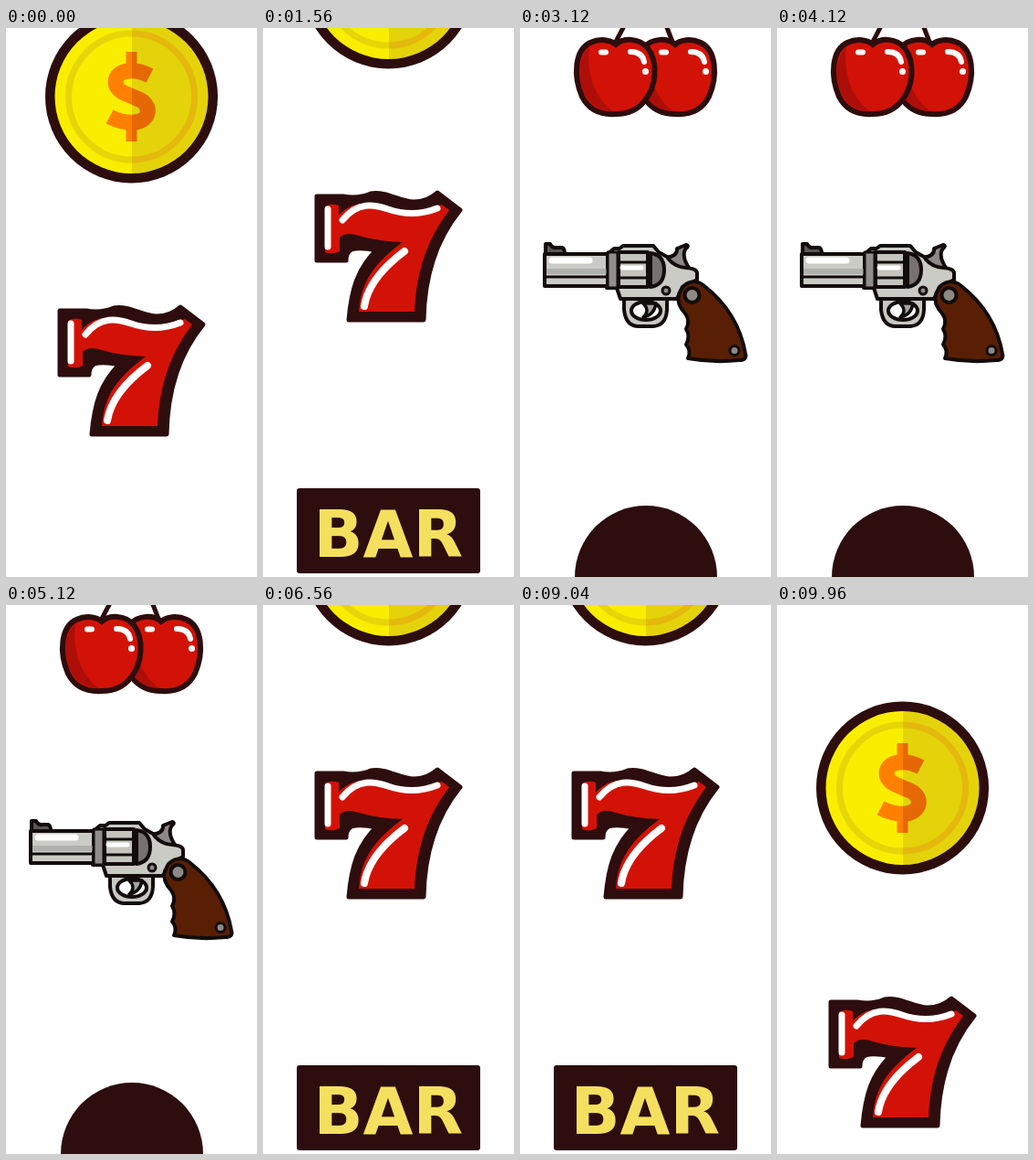
Animation of 275 by 600 pixels, one loop 10000 ms. Source, as an HTML page:

```html
<!DOCTYPE html>
<html lang="en">
<head>
<meta charset="utf-8">
<title>Slot reel</title>
<style>
html, body { margin: 0; width: 100%; height: 100%; overflow: hidden; background: #fff; }
svg { display: block; width: 100%; height: 100%; }
</style>
</head>
<body>
<svg viewBox="0 0 275 600">
  <defs>
    <linearGradient id="face" gradientUnits="userSpaceOnUse" x1="-100" x2="100" y1="0" y2="0">
      <stop offset=".5" stop-color="#f9ee00"/><stop offset=".5" stop-color="#e4d30b"/>
    </linearGradient>
    <linearGradient id="rim" gradientUnits="userSpaceOnUse" x1="-100" x2="100" y1="0" y2="0">
      <stop offset=".5" stop-color="#e5d509"/><stop offset=".5" stop-color="#e4b80c"/>
    </linearGradient>
    <linearGradient id="cash" gradientUnits="userSpaceOnUse" x1="-100" x2="100" y1="0" y2="0">
      <stop offset=".5" stop-color="#ff8000"/><stop offset=".5" stop-color="#e56804"/>
    </linearGradient>

    <g id="coin" transform="translate(137.5 0)">
      <circle r="94.5" fill="#2d0d0d"/>
      <circle r="84" fill="url(#face)"/>
      <circle r="69" fill="none" stroke="url(#rim)" stroke-width="7"/>
      <path d="M-6-49H6V-26H-6ZM-6 26H6V49H-6Z" fill="url(#cash)"/>
      <path d="M20-23C10-28 2-29-4-28C-21-26-22-9-6-3L6 2C23 8 21 26 4 28C-6 29-14 27-24 22" fill="none" stroke="url(#cash)" stroke-width="17"/>
    </g>

    <g id="seven" transform="translate(0 -375)">
      <path d="M59 309L88 309Q104 312 118 306C135 303 150 315 165 315Q180 315 191 305L216 324C193 352 177 390 176 444H94C97 410 104 388 124 368Q106 364 97 367Q91 370 91 379H59Z" fill="#2d0d0d" stroke="#2d0d0d" stroke-width="5" stroke-linejoin="round"/>
      <path d="M68 320Q75 316 83 319V330C98 312 120 316 135 321C157 329 178 326 196 318L204 324C180 356 168 390 166 435H105C107 402 122 382 153 359Q125 358 105 352Q91 347 84 354V369Q76 373 68 370Z" fill="#d31207"/>
      <path d="M71 323V364" stroke="#fff" stroke-width="7" stroke-linecap="round"/>
      <path d="M87 335C104 314 122 318 137 323C157 330 176 328 191 322" fill="none" stroke="#fff" stroke-width="7" stroke-linecap="round"/>
      <path d="M111 429Q116 398 155 369" fill="none" stroke="#fff" stroke-width="8" stroke-linecap="round"/>
    </g>

    <g id="bar">
      <rect x="37" y="-47" width="201" height="93" rx="3" fill="#2d0d0d"/>
      <text x="55.5" y="27.5" font-family="'DejaVu Sans', sans-serif" font-weight="700" font-size="71" fill="#f4e05e">BAR</text>
    </g>

    <path id="fruit" d="M105 18C113 11 130 10 140 22C152 38 149 64 137 79C128 91 117 94 105 94C90 95 76 91 68 75C58 52 60 24 77 16C88 11 99 13 105 18Z"/>
    <path id="shade" d="M76 20C58 38 61 90 102 91C83 78 72 50 76 20Z"/>
    <g id="shine" fill="none" stroke="#fff" stroke-width="6" stroke-linecap="round">
      <path d="M89 26.5H94M121 26Q134 26 136 37"/>
      <circle cx="137.5" cy="47.5" r="3.5" fill="#fff" stroke="none"/>
    </g>
    <g id="cherry">
      <path d="M104 17Q111 3 124-20L143-88Q151-40 160-3L167 15" fill="none" stroke="#2d0d0d" stroke-width="5" stroke-linejoin="round"/>
      <g fill="#d31207" stroke="#2d0d0d" stroke-width="6">
        <use href="#fruit" transform="matrix(-1 0 0 1 275 0)"/>
        <use href="#shade" x="66" fill="#ad0e08" stroke="none"/>
        <use href="#fruit"/>
        <use href="#shade" fill="#ad0e08" stroke="none"/>
      </g>
      <use href="#shine"/>
      <use href="#shine" x="66"/>
    </g>

    <g id="gun" transform="translate(0 -300)" stroke="#120c0c" stroke-width="4" stroke-linejoin="round" stroke-linecap="round">
      <path d="M28 248V236H33Q35 241 40 240H46Q49 241 49 247Z" fill="#5c5655"/>
      <path d="M114 294V308Q116 326 130 326H146Q160 325 161 308V294Z" fill="#c9c9c4"/>
      <ellipse cx="138" cy="309" rx="16" ry="10" fill="#fff"/>
      <path d="M135 301Q143 309 135 316Q147 314 149 301Z" fill="#a5a5a1" stroke-width="3.5"/>
      <path d="M158 251Q173 250 172 241L182 237Q186 238 181 242Q177 250 185 262L176 266Z" fill="#8d8987"/>
      <path d="M95 248L103 241H109L113 238H146L152 245L161 250Q168 261 182 262Q194 263 194 268V275L178 284L172 296H110L106 284H95Z" fill="#cbcbc6"/>
      <path d="M27 247H96V282H27Z" fill="#cbcbc6"/>
      <path d="M29 266H95" stroke="#b0b0ac" stroke-width="6" stroke-linecap="butt"/>
      <path d="M35 254H76" stroke="#fff" stroke-width="7"/>
      <path d="M29 272H95" stroke-width="3"/>
      <path d="M96 245H107V284H96Z" fill="#918d8b" stroke-width="3"/>
      <path d="M108 245H140V283H108Z" fill="#c4c4bf"/>
      <path d="M110 256H138M110 273H138" stroke-width="3"/>
      <path d="M112 262H133" stroke="#fff" stroke-width="5"/>
      <path d="M143 246Q158 248 158 264Q158 281 143 283Z" fill="#777170"/>
      <circle cx="160" cy="287" r="4" fill="#8d8987" stroke-width="3"/>
      <path d="M178 283Q190 272 202 282Q239 311 247 356Q249 363 240 363Q212 366 184 361Q188 352 182 346Q187 337 182 329Q187 320 181 312Q171 301 174 291Z" fill="#591f05"/>
      <circle cx="188.5" cy="292" r="8" fill="#8d8987"/>
      <circle cx="235" cy="352.5" r="5" fill="#8d8987" stroke-width="3"/>
    </g>

    <circle id="badge" cx="138" cy="0" r="78" fill="#2d0d0d"/>
  </defs>
  <rect width="275" height="600" fill="#fff"/>
  <g id="reel"></g>
</svg>
<script>
const NS = "http://www.w3.org/2000/svg";
const CELL = 300, STEP = 125, STEPS = 24, START = 21, TICK = 40;
const order = "cherry gun badge cherry coin seven bar cherry gun coin seven bar".split(" ");
const reel = document.getElementById("reel");

order.forEach((name, i) => {
  const use = document.createElementNS(NS, "use");
  use.setAttribute("href", "#" + name);
  use.setAttribute("y", i * CELL);
  reel.append(use);
});

// 24 steps a second, shown on a 25 per second clock
function draw(ms) {
  const tick = Math.floor((ms % 10000) / TICK);
  const step = (Math.round(tick * 0.96) + START) % STEPS;
  reel.setAttribute("transform", `translate(0 ${-STEP * step})`);
}

const begin = performance.now();
function loop() {
  draw(performance.now() - begin);
  requestAnimationFrame(loop);
}
draw(0);
requestAnimationFrame(loop);
</script>
</body>
</html>
```
